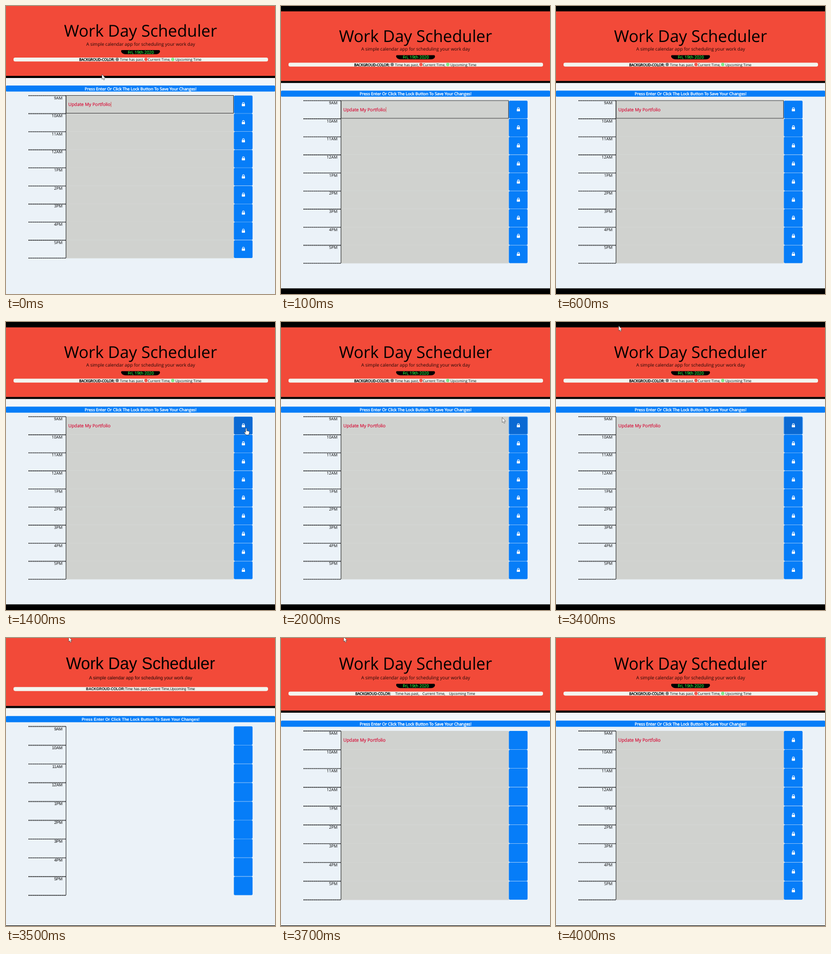
Write an HTML page that moves like this. It is 502 px wide and 536 px high and loops after 4.1 s.

```html
<!DOCTYPE html>
<html lang="en">
<head>
<meta charset="utf-8">
<title>Work Day Scheduler</title>
<style>
  html, body { margin: 0; width: 100%; height: 100%; overflow: hidden; background: #000; }
  svg { display: block; width: 502px; height: 536px; }
  text { font-family: "Open Sans", sans-serif; text-rendering: geometricPrecision; white-space: pre; }
  .bare text { font-family: "Liberation Sans", Arial, sans-serif; }
  .faux { stroke-width: .35px; }
  .bare .faux { stroke-width: 0; font-weight: 700; }
  .date, .task { stroke-width: .2px; }
</style>
</head>
<body>
<svg id="stage" viewBox="0 0 502 536"></svg>
<script>
const LOOP = 4100, STEP = 100;
const BOX_AT = 100, HOVER_AT = 1200, CLICK_AT = 1300, LEAVE_AT = 1900;
const RELOAD_AT = 3500, STYLED_AT = 3700, ICONS_AT = 3900;
const SHIFT = 9.5;            // offset of the letterboxed view
const TALL = 1.0385;          // vertical stretch of the full-height view
const ROW = 33.65, TOP = 166.4;
const HOURS = ['9AM', '10AM', '11AM', '12AM', '1PM', '2PM', '3PM', '4PM', '5PM'];
const BLUE = '#067df8', PAPER = '#ebf2f8', INK = '#000';

const rect = (x, y, w, h, fill, extra = '') =>
  `<rect x="${x}" y="${y}" width="${w}" height="${h}" fill="${fill}" ${extra}/>`;
const text = (x, y, size, str, fill = INK, extra = '') =>
  `<text x="${x}" y="${y}" font-size="${size}" fill="${fill}" ${extra}>${str}</text>`;
const dot = (x, fill) => `<circle cx="${x}" cy="99.4" r="3.1" fill="${fill}"/>`;
const MID = 'text-anchor="middle"';

const lock = y => `<g transform="translate(443 ${y})">
  <path d="M-1.7 0V-1.7a1.7 1.7 0 0 1 3.4 0V0" fill="none" stroke="#fff" stroke-width="1.1"/>
  ${rect(-3, -.6, 6, 4.1, '#fff', 'rx=".7"')}</g>`;

const dashes = y => `<path d="M42 ${y}H112" stroke="#000" stroke-width="1.6" stroke-dasharray="1.7 1"/>`;

function legend(bare) {
  if (bare) return text(251, 102, 6.7,
    '<tspan class="faux">BACKGROUD-COLOR:</tspan>Time has past,Current Time,Upcoming Time', INK, MID);
  const words = (a, b, c, d) =>
    text(a, 102, 6.68, 'BACKGROUD-COLOR:', INK, 'class="faux" stroke="#000"') +
    text(b, 102, 6.68, 'Time has past,') + text(c, 102, 6.68, 'Current Time,') +
    text(d, 102, 6.68, 'Upcoming Time');
  return `<g class="icons">${words(136.5, 212.5, 264.5, 316)}
    ${dot(207.5, '#777d7b')}${dot(261.2, '#f25a4e')}${dot(311.2, '#7fe88a')}</g>
    <g class="noicons">${words(138.7, 213.3, 264, 313.5)}</g>`;
}

function row(hour, i, bare) {
  const y = TOP + i * ROW;
  return (bare ? '' : rect(112, y, 313, ROW, '#d0d2cf') +
      `<path d="M113 ${y + ROW}H425" stroke="#d6d8d5" stroke-width=".7"/>`) +
    dashes(y + .3) + text(105.3, y + 7.1, 7.5, hour, INK, 'text-anchor="end"') +
    rect(425.3, y, 34.8, ROW, '#b9d8f7', 'rx="2"') +
    rect(425.3, y + .3, 34.8, ROW - .6, BLUE, `rx="2" ${i ? '' : 'class="first"'}`) +
    (bare ? '' : `<g class="icons">${lock(y + 16.5)}</g>`);
}

function page(bare) {
  const d = bare ? -8.2 : 0, end = TOP + 9 * ROW;
  return `<g class="${bare ? 'bare' : 'styled'}">
    ${rect(0, -2, 502, 540, PAPER)}
    ${rect(0, -2, 502, 132.3 + d, '#f24a39')}
    ${text(251, bare ? 56 : 57, 30.4, 'Work Day Scheduler', INK, MID)}
    ${text(251.2, 73.8, 8.43, 'A simple calendar app for scheduling your work day', '#1c0806', MID)}
    ${bare ? '' : `<path d="M216 82H286Q288 83 287 86Q285 89.8 280 89.8H223Q218 89.8 215.5 86Q214 83 216 82Z"/>` +
      text(251.5, 88.6, 7.7, 'Fri, 19th 2020', '#2fe93f', `${MID} class="date" stroke="#2fe93f"`)}
    <g transform="translate(0 ${d})">
      ${rect(14, 96, 475, 7.2, '#f3f5ef', 'rx="3.2"')}
      ${legend(bare)}
      ${rect(0, 130, 502, 4, '#000')}
      ${rect(0, 134, 502, 14, '#f2f6fa')}
      ${rect(0, 148, 502, 11.2, BLUE, 'rx="1.5"')}
      ${text(251.3, 156.5, 7.56, 'Press Enter Or Click The Lock Button To Save Your Changes!', '#fff',
        `${MID} class="faux" stroke="#fff"`)}
      ${HOURS.map((h, i) => row(h, i, bare)).join('')}
      ${dashes(end)}
      <path d="M112 ${TOP}V${end}" stroke="#222" stroke-width="1"/>
      ${bare ? '' : text(116.3, 186, 8.42, 'Update My Portfolio', '#d80f38', 'class="task" stroke="#d80f38"') +
        `<rect class="focus" x="112" y="166.5" width="312.6" height="33" fill="none" stroke="#333" stroke-width=".9"/>
         <path class="caret" d="M196 178.5V188" stroke="#c33" stroke-width=".7"/>`}
    </g></g>`;
}

const stage = document.getElementById('stage');
stage.innerHTML = `<g id="view">${page(false)}${page(true)}</g>
  <g class="bars">${rect(0, 0, 502, 10, '#000')}${rect(0, 525.5, 502, 10.5, '#000')}</g>
  ${rect(0, 535, 502, 1, '#000', 'class="edge"')}
  <path class="arrow" d="M0 0V9.3L2 7.6L3.4 10.8L5 10L3.7 7H6.3Z" fill="#fff" stroke="#333" stroke-width=".6"/>
  <path class="hand" d="M0 .8Q1-.4 2 .8V5L6 5.8Q7.3 6.2 7 8L6 12.6H.8L-2.4 8.4Q-2.8 6.8-1.2 7L0 8Z"
    fill="#fff" stroke="#222" stroke-width=".6"/>`;

const parts = {};
for (const k of ['styled', 'bare', 'icons', 'noicons', 'focus', 'caret', 'bars', 'edge', 'arrow', 'hand'])
  parts[k] = [...stage.querySelectorAll('.' + k)];
const show = (k, on) => parts[k].forEach(e => e.style.display = on ? '' : 'none');
const view = document.getElementById('view');
const first = stage.querySelector('.styled .first');
const place = (k, x, y) => parts[k][0].setAttribute('transform', `translate(${x} ${y})`);

// Eased point between two places, from time t0 to t1.
function glide(t, t0, t1, [x0, y0], [x1, y1]) {
  const p = Math.max(0, Math.min(1, (t - t0) / (t1 - t0))), e = p * p * (3 - 2 * p);
  return [x0 + (x1 - x0) * e, y0 + (y1 - y0) * e];
}

const REST = [179, 127], BUTTON = [447.2, 197.5], CORNER = [117, 7];

function draw(t) {
  const tall = t >= RELOAD_AT, boxed = t >= BOX_AT && !tall;
  const bare = tall && t < STYLED_AT, icons = !tall || t >= ICONS_AT;
  const pressed = t >= HOVER_AT && !tall, left = t > LEAVE_AT;

  view.setAttribute('transform', boxed ? `translate(0 ${SHIFT})` : tall ? `scale(1 ${TALL})` : '');
  show('styled', !bare);
  show('bare', bare);
  show('icons', icons);
  show('noicons', !icons);
  show('bars', boxed);
  show('edge', tall);
  show('focus', t < CLICK_AT);
  show('caret', t < CLICK_AT && t % 1060 < 530);

  first.setAttribute('fill', pressed ? '#0a69d3' : BLUE);
  first.setAttribute('stroke', pressed && left ? '#55a6fa' : 'none');

  show('hand', pressed && !left);
  place('hand', ...BUTTON);
  show('arrow', t < BOX_AT || (t > 700 && t < HOVER_AT) || (left && t < ICONS_AT));
  const [x, y] = left ? glide(t, LEAVE_AT, 2400, BUTTON, CORNER) : glide(t, 700, HOVER_AT, REST, BUTTON);
  place('arrow', x, tall ? y - SHIFT : y);
}

function tick() {
  const t = performance.now() % LOOP;
  draw(Math.floor(t / STEP) * STEP);
  requestAnimationFrame(tick);
}
tick();
</script>
</body>
</html>
```
